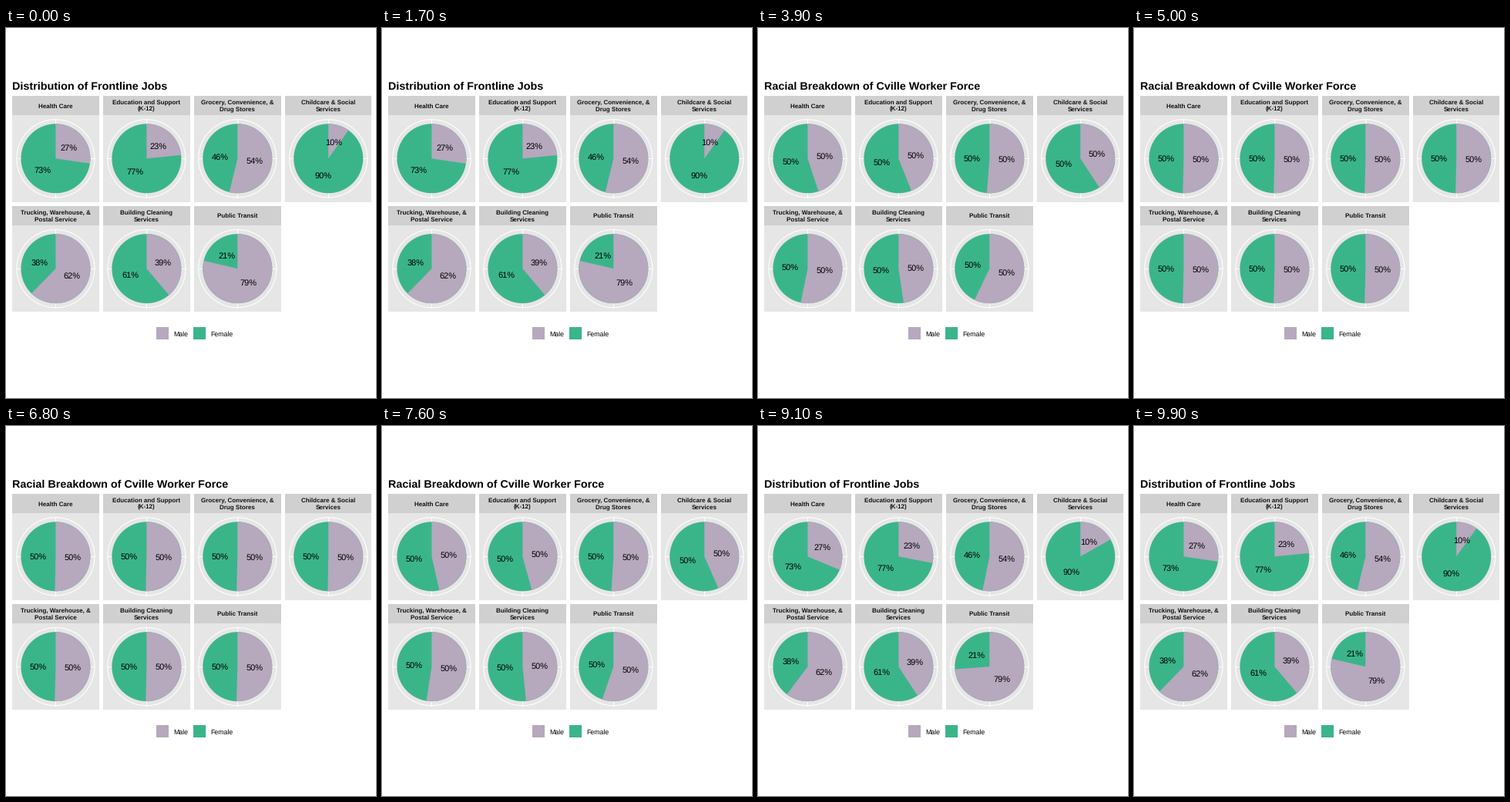
Recreate the animation shown at these times as a matplotlib script. Size 480 by 480 pixels, loop 10000 ms.

```python
import math

import matplotlib.pyplot as plt
from matplotlib.animation import FuncAnimation
from matplotlib.patches import Circle, Rectangle, Wedge

plt.rcParams["font.family"] = ["Liberation Sans", "DejaVu Sans"]
plt.rcParams["text.hinting"] = "none"

SIZE, DPI = 480, 72          # one point equals one pixel
FRAMES, INTERVAL = 100, 100
MALE, FEMALE = "#b6a8bd", "#3ab589"
PANEL, STRIP = "#e6e6e6", "#d0d0d0"
LEFT, TOP = 8.2, 88.2
SIDE, GAP, STRIP_H = 112.44, 5.5, 24.9
RADIUS, RING = 0.4 * SIDE, 0.45 * SIDE
EVEN = 0.504                 # male share of the balanced state

TITLES = ("Distribution of Frontline Jobs",
          "Racial Breakdown of Cville Worker Force")
JOBS = [
    ("Health Care", 0.273),
    ("Education and Support\n(K-12)", 0.234),
    ("Grocery, Convenience, &\nDrug Stores", 0.538),
    ("Childcare & Social\nServices", 0.098),
    ("Trucking, Warehouse, &\nPostal Service", 0.623),
    ("Building Cleaning\nServices", 0.388),
    ("Public Transit", 0.787),
]

fig = plt.figure(figsize=(SIZE / DPI, SIZE / DPI), dpi=DPI, facecolor="white")
ax = fig.add_axes([0, 0, 1, 1])
ax.set_xlim(0, SIZE)
ax.set_ylim(SIZE, 0)
ax.axis("off")


def rect(x, y, w, h, color):
    ax.add_patch(Rectangle((x, y), w, h, fc=color, ec="none"))


def write(x, y, text, size, ha="center", **style):
    """Place text with its capitals centred on y."""
    return ax.text(x, y + 0.358 * size, text, fontsize=size, ha=ha,
                   va="baseline", **style)


class Pie:
    def __init__(self, index, name, share):
        row, col = divmod(index, 4)
        x = LEFT + col * (SIDE + GAP)
        y = TOP + row * (STRIP_H + SIDE + GAP)
        self.share = share
        self.cx, self.cy = x + SIDE / 2, y + STRIP_H + SIDE / 2

        rect(x, y, SIDE, STRIP_H, STRIP)
        rect(x, y + STRIP_H, SIDE, SIDE, PANEL)
        lines = name.split("\n")
        for i, line in enumerate(lines):
            dy = (i - (len(lines) - 1) / 2) * 8.64
            write(self.cx, y + STRIP_H / 2 + dy, line, 8,
                  weight="bold", color="#121212")

        center = (self.cx, self.cy)
        ax.add_patch(Circle(center, RING, fc="none", ec="white", lw=1.07))
        for dx, dy in ((RING, 0), (0, RING)):
            ax.plot([self.cx - dx, self.cx + dx], [self.cy - dy, self.cy + dy],
                    color="white", lw=1.07)
        ax.add_patch(Circle(center, RADIUS, fc=FEMALE, ec="none", zorder=3))
        self.wedge = ax.add_patch(
            Wedge(center, RADIUS, -90, 0, fc=MALE, ec="none", zorder=4))
        self.labels = [write(*center, "", 11.04, zorder=5) for _ in range(2)]

    def update(self, p, even_labels):
        male = self.share + (EVEN - self.share) * p
        self.wedge.set_theta2(-90 + 360 * male)
        pct = 50 if even_labels else round(100 * self.share)
        for label, mid, value in zip(self.labels, (male / 2, (male + 1) / 2),
                                     (pct, 100 - pct)):
            a = 2 * math.pi * mid
            label.set_position((self.cx + RADIUS / 2 * math.sin(a),
                                self.cy - RADIUS / 2 * math.cos(a) + 3.95))
            label.set_text(f"{value}%")


pies = [Pie(i, *job) for i, job in enumerate(JOBS)]
title = write(LEFT, 75.2, "", 14.4, ha="left", weight="bold")
for x, color, name in ((194.7, MALE, "Male"), (242.8, FEMALE, "Female")):
    rect(x, 388.3, 15.86, 15.86, color)
    write(x + 22.1, 397, name, 8.8, ha="left")


def ease(t):
    t = min(max(t, 0), 1)
    return (1 - math.cos(math.pi * t)) / 2


def update(n):
    # out over steps 16-50, back over steps 67-100
    p = ease((n - 16) / 34) - ease((n - 67) / 33)
    for pie in pies:
        pie.update(p, 33 <= n < 84)
    title.set_text(TITLES[34 <= n < 85])
    return []


anim = FuncAnimation(fig, update, frames=FRAMES, interval=INTERVAL,
                     init_func=lambda: update(0), repeat=True, repeat_delay=0)
plt.show()
```
